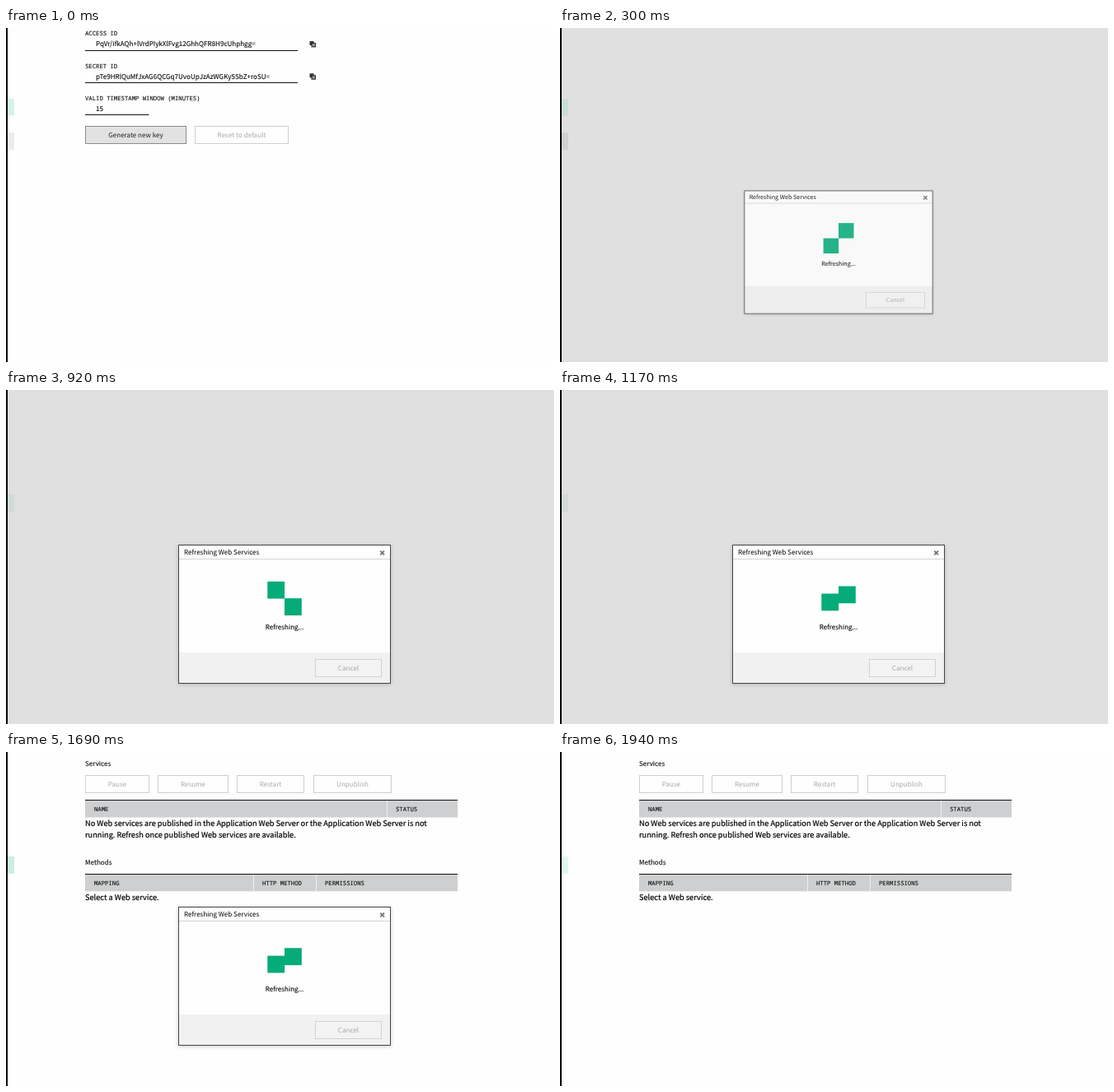
These frames come from a looping animation (665 by 406 pixels, 2310 ms). An HTML page:

```html
<!DOCTYPE html>
<html lang="en">
<head>
<meta charset="utf-8">
<title>Refreshing Web Services</title>
<style>
  html, body { margin: 0; width: 100%; height: 100%; overflow: hidden; background: #fefefe; }
  svg { display: block; width: 665px; height: 406px; }
  text { font: 8.07px "Noto Sans CJK JP", "Noto Sans CJK SC", "Noto Sans CJK", "Open Sans", sans-serif;
         text-rendering: geometricPrecision; white-space: pre; }
  .mono { font: 500 7.28px "Noto Sans Mono", "Liberation Mono", monospace;
          fill: #111; stroke: #111; stroke-width: .12; }
  .body { font-size: 9.24px; stroke: #000; stroke-width: .2; }
  .value { stroke: #000; stroke-width: .08; }
  .head { fill: #222; stroke: #222; stroke-width: .2; }
  .mid { text-anchor: middle; }
  .rule { fill: none; stroke: #111; }
  #dialog { filter: drop-shadow(0 1px 2px rgba(0, 0, 0, .2)); }
</style>
</head>
<body>
<svg id="stage" viewBox="0 0 665 406"></svg>
<script>
const LOOP = 2310, OPEN = 150, NAV = 400, CLOSE = 1690, END = 1940;

const text = (x, y, s, cls = '') => `<text x="${x}" y="${y}" class="${cls}">${s}</text>`;
const rect = (x, y, w, h, fill, more = '') =>
  `<rect x="${x}" y="${y}" width="${w}" height="${h}" fill="${fill}" ${more}/>`;
const rule = (x1, x2, y) => `<path class="rule" d="M${x1} ${y}H${x2}"/>`;
const button = (x, y, w, h, label, fill = '#fefefe', line = '#cfcfcf', ink = '#a9a9a9') =>
  rect(x, y, w, h, fill, `stroke="${line}"`) +
  `<g fill="${ink}">${text(x + w / 2, y + h / 2 + 2.7, label, 'mid')}</g>`;
const copyIcon = y =>
  rect(368.5, y, 5, 5, '#333') + rect(371, y + 2.5, 4.4, 4.4, '#999', 'stroke="#222" stroke-width="1"');
const field = (y, label, value, right) =>
  text(96, y, label, 'mono') + text(109, y + 13, value, 'value') +
  rule(96, right, Math.floor(y + 18) + .5);
const table = (y, h, cols) =>
  rect(96, y, 452, h, '#cecfd0') + rule(96, 548, y - .5) +
  cols.map(([x, name], i) =>
    (i ? rect(x - 11, y, 1, h, '#eee') : '') + text(x, y + 12.9, name, 'mono')).join('');

const keysPage =
  field(9.4, 'ACCESS ID', 'PqVr/ifkAQh+lVrdPIykXlFvg12GhhQFR8H9cUhphgg=', 354) + copyIcon(16) +
  field(48.7, 'SECRET ID', 'pTe9HRlQuMfJxAG6QCGq7UvoUpJzAzWGKy5SbZ+roSU=', 354) + copyIcon(55.3) +
  field(87.8, 'VALID TIMESTAMP WINDOW (MINUTES)', '15', 173.5) +
  button(96.5, 119.5, 122, 21, 'Generate new key', '#e2e2e2', '#8c8c8c', '#222') +
  button(229.5, 119.5, 113, 21, 'Reset to default');

const servicesPage =
  text(96, 17, 'Services', 'head') +
  [[96.5, 77, 'Pause'], [184.5, 85, 'Resume'], [280.5, 81, 'Restart'], [373.5, 94, 'Unpublish']]
    .map(([x, w, s]) => button(x, 28.5, w, 21, s)).join('') +
  table(59, 20.5, [[107, 'NAME'], [473, 'STATUS']]) +
  text(96, 90, 'No Web services are published in the Application Web Server or the Application Web Server is not', 'body') +
  text(96, 104, 'running. Refresh once published Web services are available.', 'body') +
  text(96, 136.5, 'Methods', 'head') +
  table(149, 20.3, [[107, 'MAPPING'], [311, 'HTTP METHOD'], [387, 'PERMISSIONS']]) +
  text(96, 179.7, 'Select a Web service.', 'body');

const dialog =
  rect(209.5, 188.5, 257, 168, '#fefefe') +
  rect(209.5, 319, 257, 37.5, '#f1f1f1') +
  rect(210, 205, 256, 1, '#d4d4d4') +
  rect(209.5, 188.5, 257, 168, 'none', 'stroke="#444"') +
  text(216, 200.3, 'Refreshing Web Services') +
  '<path d="M454.2 195.6l4.8 4.8m0-4.8l-4.8 4.8" stroke="#777" stroke-width="1.9"/>' +
  rect(317.3, 0, 20.8, 20.8, '#05ab78', 'id="left"') +
  rect(338, 0, 20.8, 20.8, '#05ab78', 'id="right"') +
  text(338, 290.5, 'Refreshing...', 'mid value') +
  button(375.5, 327.5, 80, 21, 'Cancel', '#f3f3f3', '#d2d2d2');

stage.innerHTML =
  `<g id="keys">${keysPage}</g><g id="services">${servicesPage}</g>` +
  rect(0, 0, 665, 406, '#e0e0e0', 'id="shade"') +
  rect(2, 86, 8, 20.5, '', 'id="tabA"') + rect(2, 127, 8, 21, '', 'id="tabB"') +
  `<g id="dialog">${dialog}</g>` + rect(0, 0, 2, 406, '#000');

const part = id => document.getElementById(id);
const show = (id, on) => part(id).setAttribute('visibility', on ? 'visible' : 'hidden');

// cubic-bezier(.25, .1, .25, 1)
function ease(x) {
  if (x <= 0) return 0;
  if (x >= 1) return 1;
  let lo = 0, hi = 1;
  for (let i = 0; i < 20; i++) {
    const s = (lo + hi) / 2;
    if (.75 * s * (1 - s) + s ** 3 < x) lo = s; else hi = s;
  }
  return .3 * lo * (1 - lo) ** 2 + 3 * lo * lo * (1 - lo) + lo ** 3;
}

// The squares swap heights every 640 ms: a 520 ms move, then a rest
function swap(t) {
  const since = t - 310;
  if (since < 0) return 0;
  const p = ease(since % 640 / 520);
  return Math.floor(since / 640) % 2 ? 1 - p : p;
}

function draw(t) {
  const modal = t >= OPEN && t < CLOSE;
  show('keys', t < OPEN);
  show('services', t >= CLOSE);
  show('shade', modal);
  show('tabA', t < NAV);
  show('dialog', t >= OPEN && t < END);
  part('tabA').setAttribute('fill', modal ? '#c9ded6' : '#d7f3e9');
  part('tabB').setAttribute('fill',
    t < OPEN ? '#ececea' : t < NAV ? '#d3d1d0' : modal ? '#d0dbd7' : t < END ? '#cbeee2' : '#e0f6ef');

  const opened = ease((t - 89) / 350), closed = ease((t - 1702) / 240);
  const scale = (.01 + .99 * opened) * (1 - .3 * closed);
  part('dialog').setAttribute('transform', `translate(338 273) scale(${scale}) translate(-338 -273)`);
  part('dialog').setAttribute('opacity', opened ** 1.4 * (1 - closed ** 1.4));

  const rise = 20.6 * swap(t);
  part('left').setAttribute('y', 253.4 - rise);
  part('right').setAttribute('y', 232.6 + rise);
}

// Motion advances in 50 ms ticks
function tick(t) {
  const shift = t < 670 ? 0 : t < 1390 ? 20 : 40;
  return t - (t - shift) % 50;
}

const start = performance.now();
function loop() {
  draw(tick((performance.now() - start) % LOOP));
  requestAnimationFrame(loop);
}
loop();
</script>
</body>
</html>
```
